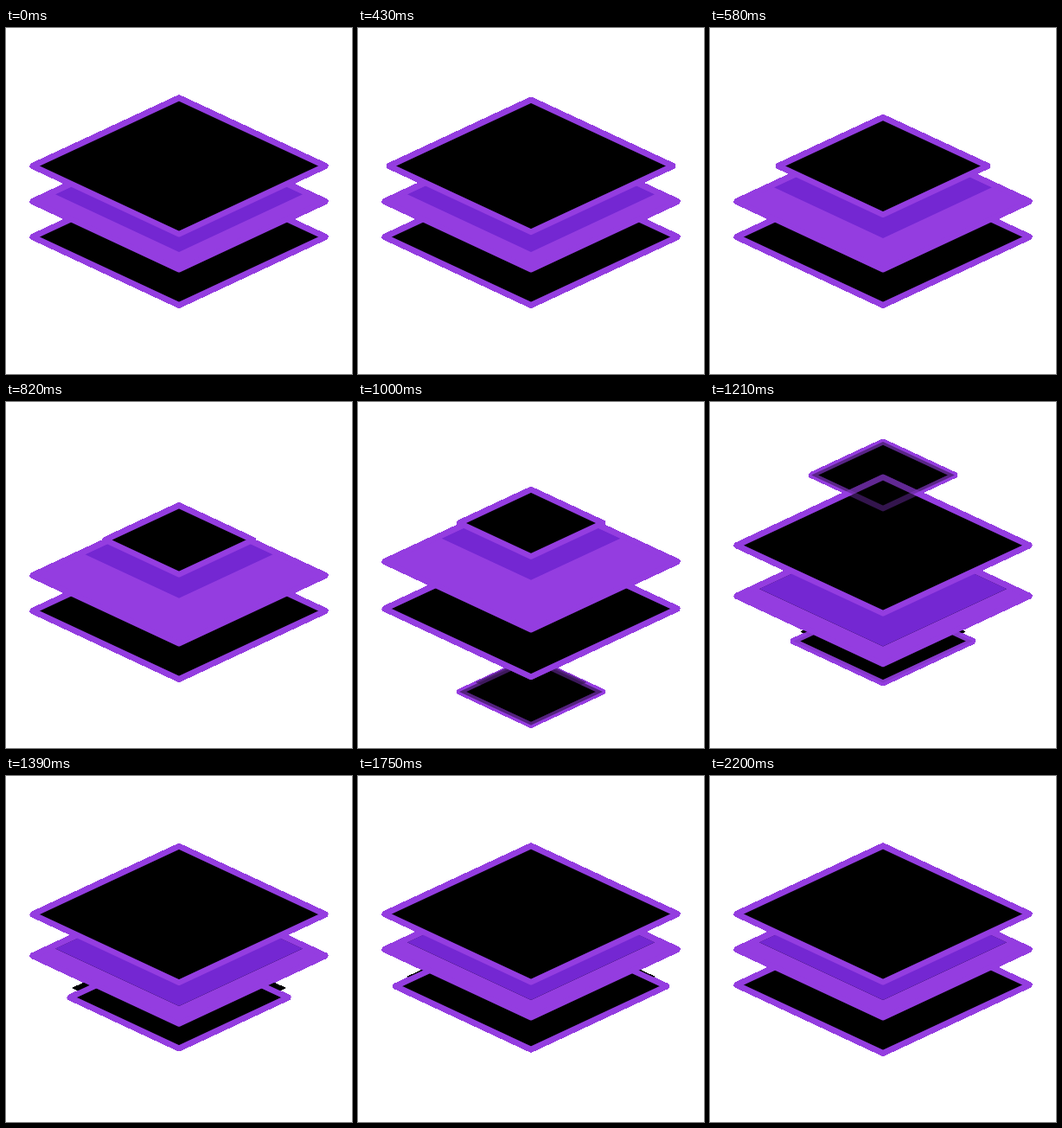
Write an HTML page with a canvas that moves like this. It is 400 px wide and 400 px high and loops after 2230 ms.

```html
<!DOCTYPE html>
<html lang="en">
<head>
<meta charset="utf-8">
<title>Layers</title>
<style>
html, body { margin: 0; width: 100%; height: 100%; overflow: hidden; background: #fff; }
canvas { display: block; width: 400px; height: 400px; }
</style>
</head>
<body>
<canvas id="stage" width="400" height="400"></canvas>
<script>
const SIZE = 400, LOOP = 2230, HOLD = 430, STEP = 30;
const PURPLE = '#943de0', SHADE = '#7427d2';
const FULL = 168.8, SMALL = 82.7, RATIO = 0.466, LINE = 6.6;
const TOP = 159.6, MID = 200.6, LOW = 241.6;
const CUTOFF = 20;

const view = document.getElementById('stage').getContext('2d');
const buffer = document.createElement('canvas');
buffer.width = buffer.height = SIZE;
const g = buffer.getContext('2d', { willReadFrequently: true });

const lerp = (a, b, p) => a + (b - a) * p;
const span = (t, start, length) => Math.min(1, Math.max(0, (t - start) / length));
const out = (u, power) => 1 - Math.pow(1 - u, power);
const smooth = u => u * u * (3 - 2 * u);
const inOut = u => u < 0.5 ? 2 * u * u : 1 - 2 * (1 - u) * (1 - u);

function diamond(y, w) {
  const h = w * RATIO;
  g.beginPath();
  g.moveTo(200 - w, y);
  g.lineTo(200, y - h);
  g.lineTo(200 + w, y);
  g.lineTo(200, y + h);
  g.closePath();
}

function fill(y, w, color, alpha) {
  if (alpha <= 0) return;
  g.globalAlpha = alpha;
  g.fillStyle = color;
  diamond(y, w);
  g.fill();
}

function outline(y, w, alpha) {
  g.globalAlpha = alpha;
  g.strokeStyle = PURPLE;
  g.lineWidth = LINE;
  g.lineJoin = 'round';
  diamond(y, w);
  g.stroke();
}

// Black and purple are the opacities of the two stacked fills.
function sheet(y, w, black, purple, alpha, shade) {
  fill(y, w, '#000', black);
  fill(y, w, PURPLE, purple);
  if (shade) {
    fill(y + shade.dy, shade.w, '#000', black);
    fill(y + shade.dy, shade.w, SHADE, purple);
  }
  outline(y, w, alpha);
}

// A cast shadow hangs from the inner top corner of its sheet.
const hung = w => ({ w, dy: w * RATIO - 75 });

function drawNewSheet(t) {
  const y = Math.min(341.5, Math.max(LOW, 240 + 95 * Math.exp(-0.00456 * (t - 1000))));
  const w = lerp(SMALL, FULL, out(span(t, 1068, 1100), 2));
  const shade = lerp(64, 143, out(span(t, 1068, 648), 2));
  const alpha = span(t, 940, 300);
  sheet(y, w, alpha, 0, alpha, { w: shade, dy: -11 });
}

function drawTopSheet(t) {
  const y = lerp(TOP, 71, smooth(span(t, 857, 469)));
  const w = lerp(FULL, SMALL, out(span(t, 415, 490), 2));
  const alpha = 1 - span(t, 1000, 321);
  sheet(y, w, alpha, 0, alpha);
}

function drawScene(t) {
  g.clearRect(0, 0, SIZE, SIZE);
  if (t > 940) drawNewSheet(t);

  const lowY = lerp(LOW, MID, inOut(span(t, 870, 740)));
  sheet(lowY, FULL, 1, span(t, 1000, 167), 1, hung(143));

  const midY = lerp(MID, TOP, out(span(t, 893, 593), 2.5));
  const shade = lerp(143, 103, out(span(t, 430, 620), 2));
  sheet(midY, FULL, span(t, 1000, 150), 1 - span(t, 1000, 133), 1, hung(shade));

  drawTopSheet(t);
  g.globalAlpha = 1;
}

// Hard-edged cutout: every covered pixel becomes opaque, the rest is white.
function present() {
  const image = g.getImageData(0, 0, SIZE, SIZE);
  const d = image.data;
  for (let i = 0; i < d.length; i += 4) {
    if (d[i + 3] <= CUTOFF) d[i] = d[i + 1] = d[i + 2] = 255;
    d[i + 3] = 255;
  }
  view.putImageData(image, 0, 0);
}

const start = performance.now();
let shown = -1;

function tick() {
  const t = (performance.now() - start) % LOOP;
  const at = t < HOLD ? 0 : HOLD + Math.floor((t - HOLD) / STEP) * STEP;
  if (at !== shown) {
    shown = at;
    drawScene(at);
    present();
  }
  requestAnimationFrame(tick);
}
tick();
</script>
</body>
</html>
```
